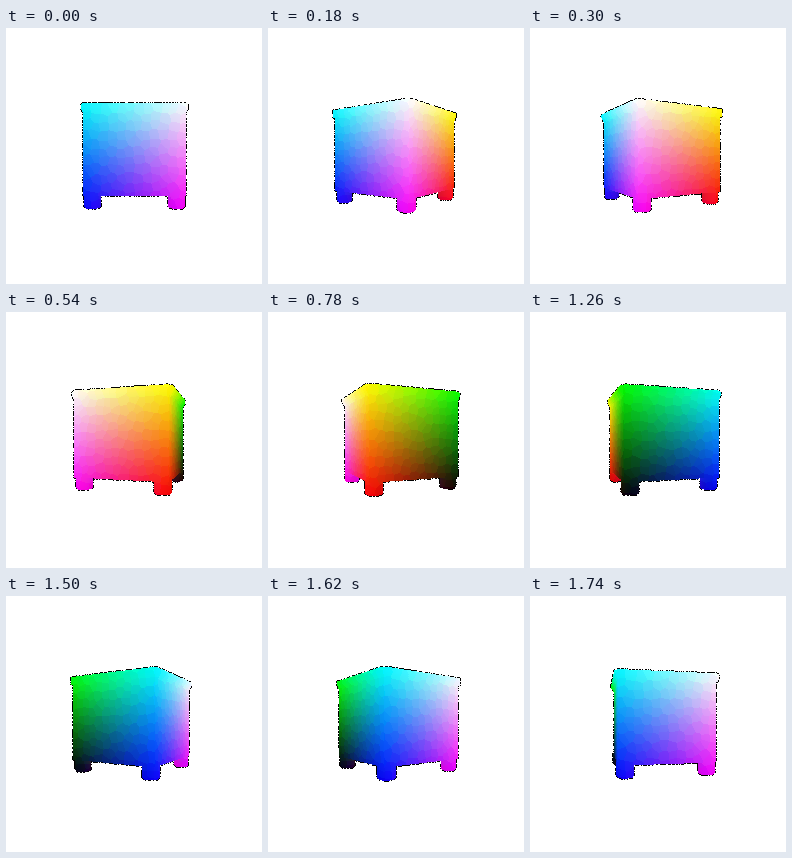
Write an HTML page with a canvas that moves like this. It is 256 px wide and 256 px high and loops after 1.8 s.

```html
<!DOCTYPE html>
<html lang="en">
<head>
<meta charset="utf-8">
<title>Turning cabinet</title>
<style>
  html, body { margin: 0; width: 100%; height: 100%; overflow: hidden; background: #fff; }
  canvas { display: block; width: 256px; height: 256px; }
</style>
</head>
<body>
<canvas id="stage" width="256" height="256"></canvas>
<script>
const SIZE = 256, STEPS = 30, STEP_MS = 60;
const CX = 128.5, CY = 128, FOCAL = 258, DIST = 5.7;
const TOP = 0.964, BASE = -0.978, CELL = 0.16;
const ctx = document.getElementById('stage').getContext('2d');

// Square prisms: half width, bottom, top
const boxes = [
  [1, 0.875, TOP],
  [0.98, 0.845, 0.875],
  [0.96, 0.81, 0.845],
  [0.942, -0.741, 0.81]
];
const CORNER = 1.92; // limit of |x| + |z|, trims the corners of the lid

// Round feet with a slightly narrower tip: radius, bottom, top
const feet = [[0.163, -0.955, -0.7], [0.143, BASE, -0.955]];
const FOOT_AT = 0.795;

function hash(a, b, c) {
  let h = Math.imul(a, 374761393) ^ Math.imul(b, 668265263) ^ Math.imul(c, 2147474471);
  h = Math.imul(h ^ (h >>> 13), 1274126177);
  h = Math.imul(h ^ (h >>> 15), 2246822519);
  return ((h ^ (h >>> 16)) >>> 0) / 4294967296;
}

function hitBox(o, d, [half, low, high]) {
  let near = 0, far = Infinity;
  const clip = (from, dir, min, max) => {
    const inv = 1 / (dir || 1e-9);
    const a = (min - from) * inv, b = (max - from) * inv;
    near = Math.max(near, Math.min(a, b));
    far = Math.min(far, Math.max(a, b));
  };
  clip(o[0], d[0], -half, half);
  clip(o[1], d[1], low, high);
  clip(o[2], d[2], -half, half);
  clip(o[0] + o[2], d[0] + d[2], -CORNER, CORNER);
  clip(o[0] - o[2], d[0] - d[2], -CORNER, CORNER);
  return near <= far ? near : Infinity;
}

function hitFoot(o, d, x, z, [r, low, high]) {
  const ox = o[0] - x, oz = o[2] - z;
  const a = d[0] * d[0] + d[2] * d[2];
  const b = ox * d[0] + oz * d[2];
  const disc = b * b - a * (ox * ox + oz * oz - r * r);
  if (disc < 0) return Infinity;
  const t = (-b - Math.sqrt(disc)) / a;
  const y = o[1] + t * d[1];
  return y >= low && y <= high ? t : Infinity;
}

function trace(o, d) {
  let t = Infinity;
  for (const box of boxes) t = Math.min(t, hitBox(o, d, box));
  if (d[1] < -0.1) {
    for (const x of [-FOOT_AT, FOOT_AT])
      for (const z of [-FOOT_AT, FOOT_AT])
        for (const foot of feet) t = Math.min(t, hitFoot(o, d, x, z, foot));
  }
  return t;
}

// Nearest jittered seed on a face
function nearestSeed(u, v, face) {
  const iu = Math.floor(u / CELL), iv = Math.floor(v / CELL);
  const jitter = (a, b, salt) => 0.15 + 0.7 * hash(a, b, salt);
  let best = Infinity, seed;
  for (let a = iu - 1; a <= iu + 1; a++)
    for (let b = iv - 1; b <= iv + 1; b++) {
      const su = (a + jitter(a, b, face)) * CELL;
      const sv = (b + jitter(a, b, face + 11)) * CELL;
      const dist = (su - u) ** 2 + (sv - v) ** 2;
      if (dist < best) { best = dist; seed = [su, sv]; }
    }
  return seed;
}

function colour(p) {
  const side = Math.abs(p[0]) > Math.abs(p[2]) ? 0 : 2;
  const along = 2 - side;
  const face = side + (p[side] > 0 ? 5 : 1);
  const [u, v] = nearestSeed(p[along], p[1], face);
  const q = p.slice();
  q[along] += (u - q[along]) * 0.6;
  q[1] += (v - q[1]) * 0.6;
  return [(q[0] + 1) / 2, (q[1] - BASE) / (TOP - BASE), (q[2] + 1) / 2];
}

function render(step) {
  const angle = step / STEPS * 2 * Math.PI;
  const c = Math.cos(angle), s = Math.sin(angle);
  const turn = (x, y, z) => [x * c + z * s, y, z * c - x * s];
  const eye = turn(0, 0, DIST);
  const image = ctx.createImageData(SIZE, SIZE);
  const data = image.data.fill(255);
  const solid = new Uint8Array(SIZE * SIZE);

  for (let y = 66; y < 190; y++)
    for (let x = 60; x < 198; x++) {
      const ray = turn((x + 0.5 - CX) / FOCAL, (CY - y - 0.5) / FOCAL, -1);
      const t = trace(eye, ray);
      if (t === Infinity) continue;
      const i = y * SIZE + x;
      solid[i] = 1;
      colour(eye.map((e, k) => e + t * ray[k])).forEach((v, k) => {
        data[i * 4 + k] = v * 255;
      });
    }

  // Rough dark rim
  for (let y = 65; y < 191; y++)
    for (let x = 59; x < 199; x++) {
      const i = y * SIZE + x;
      const around = solid[i - 1] + solid[i + 1] + solid[i - SIZE] + solid[i + SIZE];
      if (!solid[i] && around && hash(x, y, step + 40) < 0.65) data.fill(0, i * 4, i * 4 + 3);
    }
  return image;
}

const cache = [];
let shown = -1;

function draw() {
  const step = Math.floor(performance.now() / STEP_MS) % STEPS;
  if (step !== shown) {
    cache[step] = cache[step] || render(step);
    ctx.putImageData(cache[step], 0, 0);
    shown = step;
  }
  requestAnimationFrame(draw);
}
draw();
</script>
</body>
</html>
```
